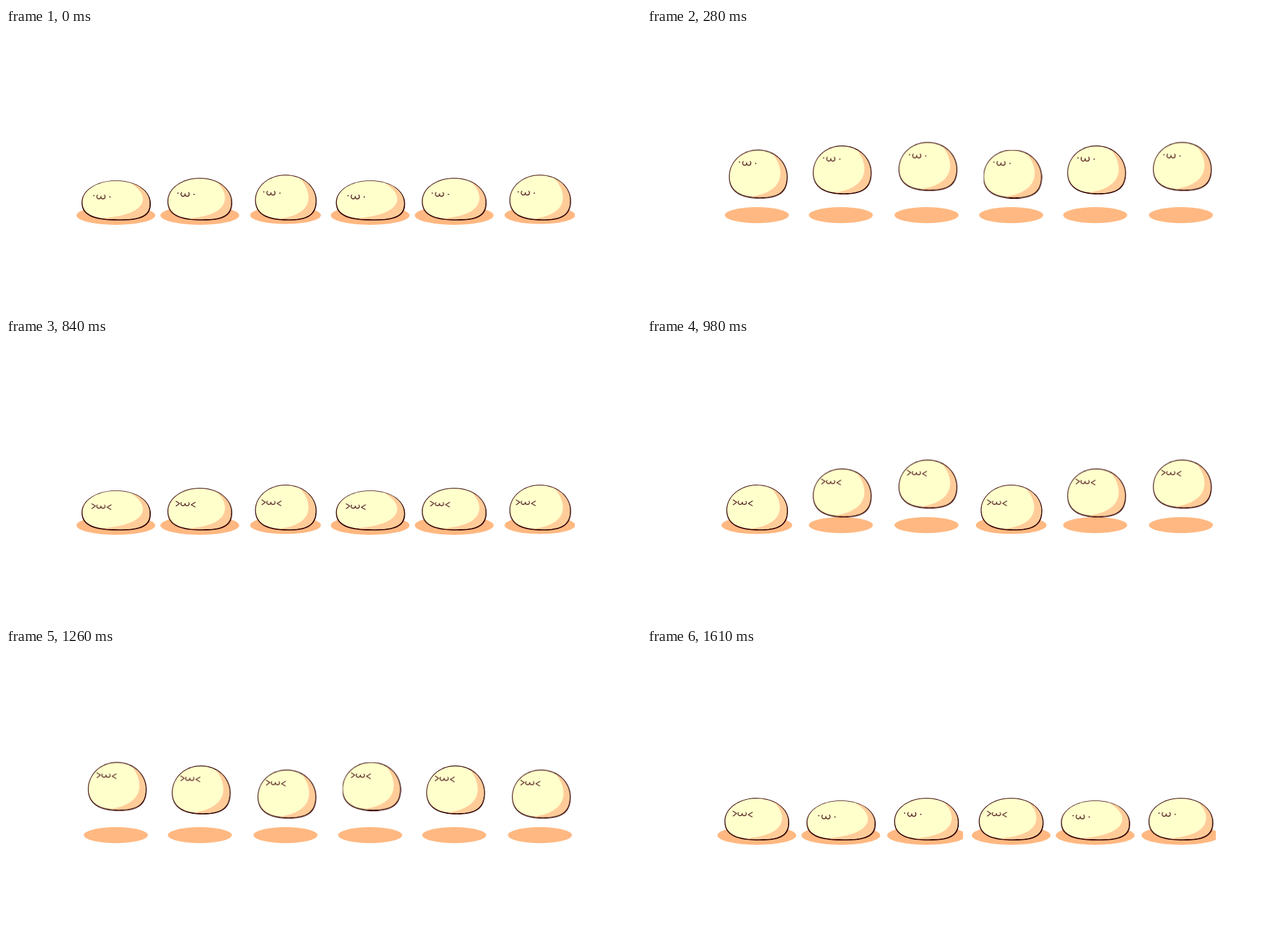
Recreate the animation shown at these times as an HTML page without scripts. Size 1000 px wide and 444 px high, loop 1680 ms.

```html
<!DOCTYPE html>
<html lang="en">
<head>
<meta charset="utf-8">
<title>Bouncing buns</title>
<style>
html, body { margin: 0; width: 100%; height: 100%; overflow: hidden; background: #fff; }
svg { display: block; width: 100%; height: 100%; }

.shadow { fill: #ffb881; }
.ink { fill: #300; }
.skin { fill: #ffc; }
.shade { fill: #fc9; }
.line { fill: none; stroke: #4d1a1a; stroke-width: 1.3; stroke-linecap: round; stroke-linejoin: round; }
.eye { fill: #4d1a1a; }

/* --n is how many 70 ms beats a bun runs ahead */
.bun * { animation: 840ms step-end calc(var(--n) * -70ms) infinite; }
.flat, .mid, .round, .air, .calm, .squint { visibility: hidden; }
.bun .flat { animation-name: flat; }
.bun .mid { animation-name: mid; }
.bun .round { animation-name: round; }
.bun .air { animation-name: air; }
.bun .ball { animation-name: air, hop; }
.bun .face { animation-name: face; }
.bun .calm { animation-name: calm; animation-duration: 1680ms; }
.bun .squint { animation-name: squint; animation-duration: 1680ms; }

@keyframes flat {
  0% { visibility: visible; }
  8.333% { visibility: hidden; }
}
@keyframes mid {
  8.333%, 91.666% { visibility: visible; }
  0%, 16.666% { visibility: hidden; }
}
@keyframes round {
  16.666%, 83.333% { visibility: visible; }
  0%, 25%, 91.666% { visibility: hidden; }
}
@keyframes air {
  25% { visibility: visible; }
  0%, 83.333% { visibility: hidden; }
}
@keyframes hop {
  0%, 25%, 75% { transform: translateY(-20.5px); }
  33.333%, 66.666% { transform: translateY(-34.5px); }
  41.666%, 58.333% { transform: translateY(-41px); }
  50% { transform: translateY(-46.5px); }
}
@keyframes face {
  0% { transform: translate(-23.5px, -37px); }
  8.333%, 91.666% { transform: translate(-23.2px, -41px); }
  16.666%, 83.333% { transform: translate(-23px, -43px); }
  25%, 75% { transform: translate(-16px, -75.8px); }
  33.333%, 66.666% { transform: translate(-16px, -89.8px); }
  41.666%, 58.333% { transform: translate(-15.8px, -96.5px); }
  50% { transform: translate(-15.5px, -101.5px); }
}
@keyframes calm {
  0% { visibility: visible; }
  50% { visibility: hidden; }
}
@keyframes squint {
  0% { visibility: hidden; }
  50% { visibility: visible; }
}
</style>
</head>
<body>
<svg viewBox="0 0 1000 444">
  <defs>
    <path id="flat-body" d="M0-63C31-63 55-48 55-26C55-5 38 0 4 0C-34 0-54-7-54-28C-54-48-30-63 0-63Z"/>
    <path id="mid-body" d="M0-67C30-67 51-49 51-28C51-6 36 0 4 0C-32 0-51-8-51-30C-51-51-28-67 0-67Z"/>
    <path id="round-body" d="M0-72C29-72 49-52 49-31C49-7 34 0 4 0C-29 0-48-9-48-32C-48-54-26-72 0-72Z"/>
    <path id="ball-body" d="M2-77C29-77 48.5-57 48.5-34C48.5-8 33 0 5 0C-25 0-44-10-44-34C-44-58-24-77 2-77Z"/>

    <clipPath id="flat-clip"><use href="#flat-body"/></clipPath>
    <clipPath id="mid-clip"><use href="#mid-body"/></clipPath>
    <clipPath id="round-clip"><use href="#round-body"/></clipPath>
    <clipPath id="ball-clip"><use href="#ball-body"/></clipPath>
    <clipPath id="edge-a"><rect x="-80" y="-200" width="137.5" height="300"/></clipPath>
    <clipPath id="edge-b"><rect x="-80" y="-200" width="134.5" height="300"/></clipPath>

    <g id="flat">
      <ellipse class="shadow" cy="-8" rx="62" ry="15"/>
      <use class="ink" href="#flat-body"/>
      <g transform="translate(-.2 -1.8) scale(.97 .96)">
        <use class="skin" href="#flat-body"/>
        <path class="shade" clip-path="url(#flat-clip)" d="M26-58C50-42 49-25 30-14C14-5-8-3-30-1L60 5V-63Z"/>
      </g>
    </g>
    <g id="mid">
      <ellipse class="shadow" cy="-8" rx="62" ry="15"/>
      <use class="ink" href="#mid-body"/>
      <g transform="translate(-.2 -1.8) scale(.97 .96)">
        <use class="skin" href="#mid-body"/>
        <path class="shade" clip-path="url(#mid-clip)" d="M27-62C45-45 46-26 29-14C16-6 0-3-22-1L60 5V-67Z"/>
      </g>
    </g>
    <g id="round">
      <ellipse class="shadow" cy="-8.2" rx="55.7" ry="13.7"/>
      <use class="ink" href="#round-body"/>
      <g transform="translate(-.2 -1.8) scale(.97 .96)">
        <use class="skin" href="#round-body"/>
        <path class="shade" clip-path="url(#round-clip)" d="M24-67C41-48 42-26 27-14C17-7 8-3-12-1L60 5V-72Z"/>
      </g>
    </g>
    <g id="ball">
      <use class="ink" href="#ball-body"/>
      <g transform="translate(-.2 -1.8) scale(.97 .96)">
        <use class="skin" href="#ball-body"/>
        <path class="shade" clip-path="url(#ball-clip)" d="M26-71C41-53 43-30 29-17C19-8 5-3-12-1L60 5V-77Z"/>
      </g>
    </g>
    <ellipse id="spot" class="shadow" cy="-8.4" rx="50.4" ry="12.6"/>

    <g id="calm">
      <circle class="eye" cx="-11.3" cy="-2" r="1"/>
      <circle class="eye" cx="14.2" r="1"/>
      <path class="line" d="M-5.5-3C-8 0-5.5 3-3 3Q0 2.8 0-1Q0 3 3.3 3C6.8 3 7.2-1 5.5-3"/>
    </g>
    <g id="squint">
      <path class="line" d="M-14.3-5L-8.8-1.5L-14 2.5M16-3.3L9.7.5L15.7 4"/>
      <path class="line" d="M-5.8-3C-8 0-5.5 2-3 2Q0 1.8 0-1.5Q0 2 3.3 2C6.8 2 7.2-1 5.8-3"/>
    </g>
  </defs>

  <g class="bun" transform="translate(173 303)" style="--n:0">
    <use class="flat" href="#flat"/><use class="mid" href="#mid"/><use class="round" href="#round"/>
    <use class="air" href="#spot"/><use class="air ball" href="#ball"/>
    <g class="face"><use class="calm" href="#calm"/><use class="squint" href="#squint"/></g>
  </g>
  <g class="bun" transform="translate(305.2 303)" style="--n:1">
    <use class="flat" href="#flat"/><use class="mid" href="#mid"/><use class="round" href="#round"/>
    <use class="air" href="#spot"/><use class="air ball" href="#ball"/>
    <g class="face"><use class="calm" href="#calm"/><use class="squint" href="#squint"/></g>
  </g>
  <g class="bun" transform="translate(440.2 303)" style="--n:2" clip-path="url(#edge-a)">
    <use class="flat" href="#flat"/><use class="mid" href="#mid"/><use class="round" href="#round"/>
    <use class="air" href="#spot"/><use class="air ball" href="#ball"/>
    <g class="face"><use class="calm" href="#calm"/><use class="squint" href="#squint"/></g>
  </g>
  <g class="bun" transform="translate(573.5 303)" style="--n:0">
    <use class="flat" href="#flat"/><use class="mid" href="#mid"/><use class="round" href="#round"/>
    <use class="air" href="#spot"/><use class="air ball" href="#ball"/>
    <g class="face"><use class="calm" href="#calm"/><use class="squint" href="#squint"/></g>
  </g>
  <g class="bun" transform="translate(705.8 303)" style="--n:1">
    <use class="flat" href="#flat"/><use class="mid" href="#mid"/><use class="round" href="#round"/>
    <use class="air" href="#spot"/><use class="air ball" href="#ball"/>
    <g class="face"><use class="calm" href="#calm"/><use class="squint" href="#squint"/></g>
  </g>
  <g class="bun" transform="translate(840.8 303)" style="--n:2" clip-path="url(#edge-b)">
    <use class="flat" href="#flat"/><use class="mid" href="#mid"/><use class="round" href="#round"/>
    <use class="air" href="#spot"/><use class="air ball" href="#ball"/>
    <g class="face"><use class="calm" href="#calm"/><use class="squint" href="#squint"/></g>
  </g>
</svg>
</body>
</html>
```
